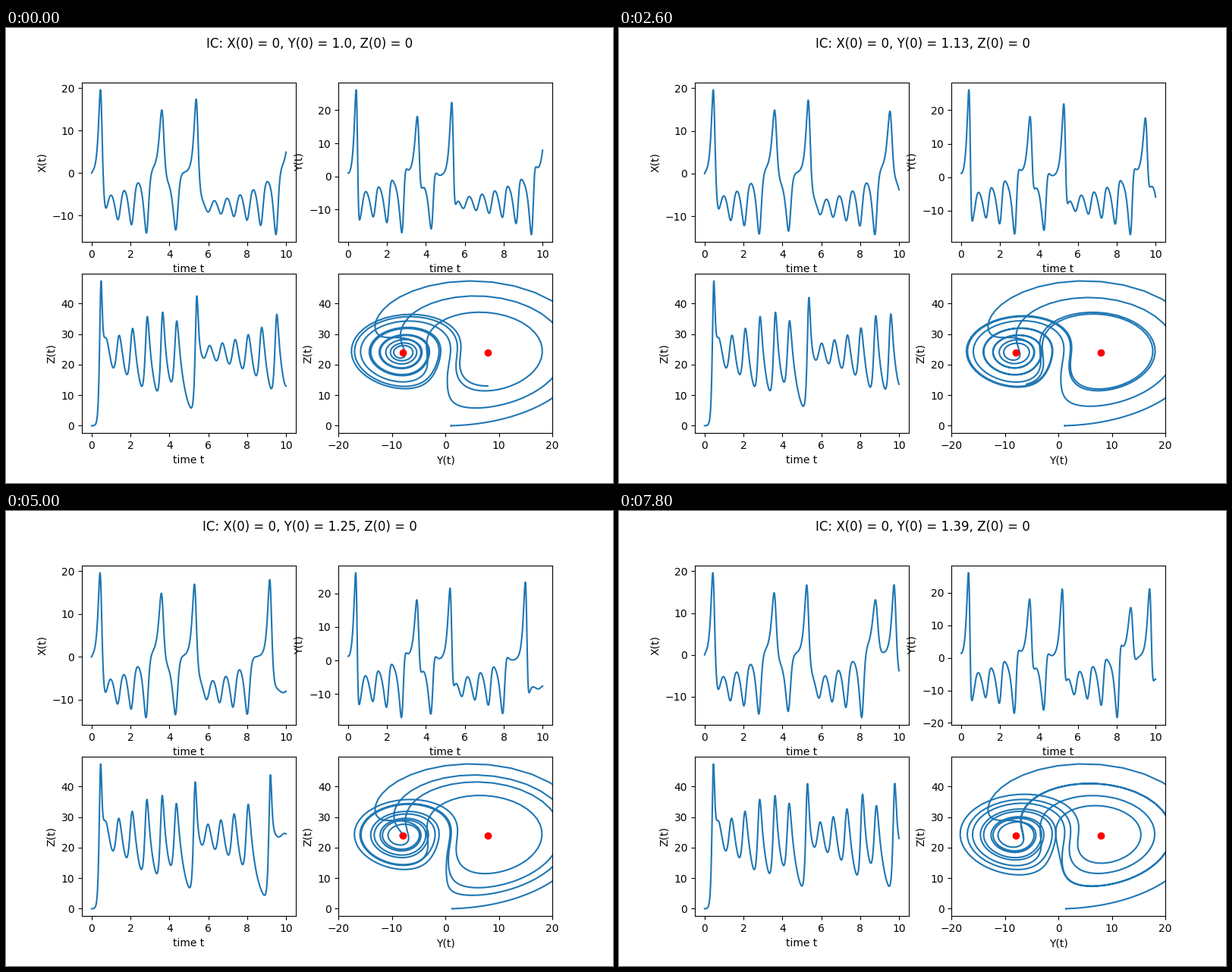
Animation of 800x600 px, one loop 8 s. Source, as a matplotlib script:

```python
import numpy as np
import matplotlib.pyplot as plt
from matplotlib.animation import FuncAnimation

SIGMA, RHO, BETA = 10.0, 25.0, 8.0 / 3.0
DT, STEPS = 0.01, 1000
FRAMES, INTERVAL = 40, 200


def lorenz(y0):
    """Forward Euler solution of the Lorenz system from (0, y0, 0)."""
    path = np.zeros((STEPS + 1, 3))
    x, y, z = 0.0, y0, 0.0
    path[0] = x, y, z
    for i in range(1, STEPS + 1):
        dx = SIGMA * (y - x)
        dy = x * (RHO - z) - y
        dz = x * y - BETA * z
        x, y, z = x + DT * dx, y + DT * dy, z + DT * dz
        path[i] = x, y, z
    return path.T


t = np.arange(STEPS + 1) * DT
fig, axes = plt.subplots(2, 2, figsize=(8, 6), dpi=100)
ax_x, ax_y, ax_z, ax_phase = axes.flat
title = fig.suptitle("")

series = []
for ax, name in zip((ax_x, ax_y, ax_z), "XYZ"):
    series.append(ax.plot([], [], color="C0")[0])
    ax.set_xlabel("time t")
    ax.set_ylabel(f"{name}(t)")

orbit, = ax_phase.plot([], [], color="C0")
eq = np.sqrt(BETA * (RHO - 1))
ax_phase.plot([-eq, eq], [RHO - 1, RHO - 1], "ro")
ax_phase.set_xlim(-20, 20)
ax_phase.set_xlabel("Y(t)")
ax_phase.set_ylabel("Z(t)")


def update(frame):
    y0 = round(1 + 0.01 * frame, 2)
    path = lorenz(y0)
    for line, values in zip(series, path):
        line.set_data(t, values)
    orbit.set_data(path[1], path[2])
    for ax in axes.flat:
        ax.relim()
        ax.autoscale_view()
    title.set_text(f"IC: X(0) = 0, Y(0) = {y0}, Z(0) = 0")
    return [*series, orbit, title]


anim = FuncAnimation(fig, update, frames=FRAMES, interval=INTERVAL,
                     repeat=True, repeat_delay=0)
plt.show()
```
